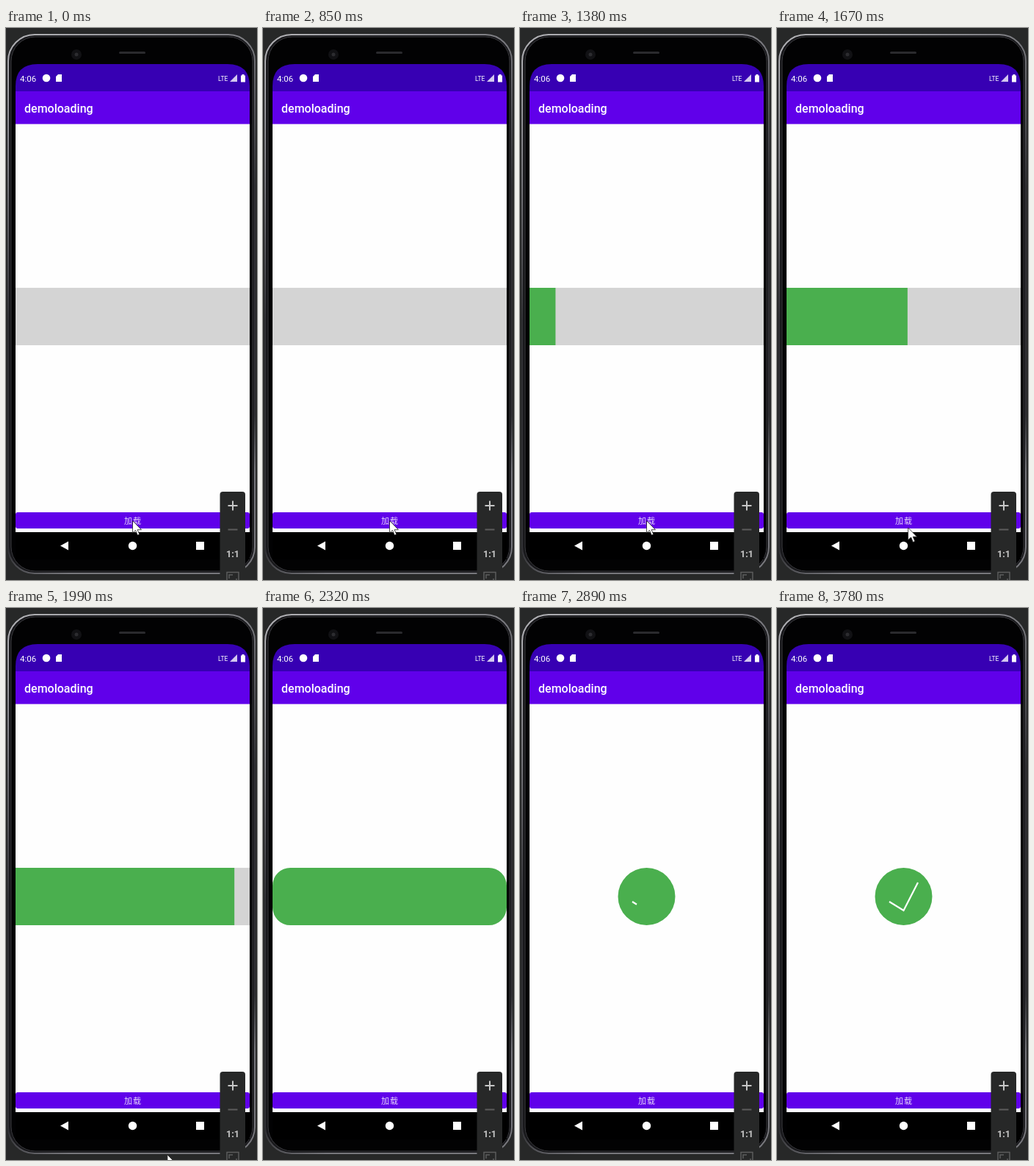
These frames come from a looping animation (342 px wide and 750 px high, 3.82 s). An HTML page:

```html
<!DOCTYPE html>
<html lang="en">
<head>
<meta charset="utf-8">
<title>Loading bar</title>
<style>
  html, body { margin: 0; width: 100%; height: 100%; overflow: hidden; background: #272828; }
  svg { display: block; width: 342px; height: 750px; }
  text { font-family: Roboto, "Noto Sans CJK SC", "Noto Sans CJK", sans-serif; fill: #fff; }
</style>
</head>
<body>
<svg viewBox="0 0 342 750">
  <defs>
    <linearGradient id="edge" x2=".25" y2="1">
      <stop offset="0" stop-color="#b4b4b8"/>
      <stop offset=".25" stop-color="#77777c"/>
      <stop offset=".5" stop-color="#303034"/>
      <stop offset=".9" stop-color="#303034"/>
      <stop offset="1" stop-color="#77777c"/>
    </linearGradient>
  </defs>

  <!-- Phone body -->
  <rect width="342" height="750" fill="#272828"/>
  <rect x="3" y="9" width="336" height="732" rx="36" fill="#18181b" stroke="url(#edge)" stroke-width="2"/>
  <rect x="7" y="12" width="329" height="726" rx="33" fill="#020203" stroke="#38383c"/>
  <circle cx="96" cy="36" r="7" fill="#111114"/>
  <circle cx="96" cy="36" r="2.5" fill="#2c2c30"/>
  <rect x="154" y="32" width="36" height="3" rx="1.5" fill="#2a2a2d"/>

  <!-- Screen -->
  <path d="M13 87V79Q13 49 43 49H302Q332 49 332 79V87Z" fill="#3700b3"/>
  <rect x="13" y="86" width="319" height="45" fill="#6000ea"/>
  <rect x="13" y="130.5" width="319" height="554.5" fill="#fefefe"/>
  <rect x="13" y="685" width="319" height="37" fill="#000"/>

  <!-- Status bar -->
  <text x="19" y="72.5" font-size="11.5">4:06</text>
  <circle cx="55" cy="68" r="5.3" fill="#fff"/>
  <path d="M71 63H76V73H68V66Z" fill="#fff"/>
  <text x="289" y="71.5" font-size="8.5">LTE</text>
  <path d="M305 73L315 63V73Z" fill="#d4c8f0"/>
  <path d="M320 64.5H321.5V63H324.5V64.5H326V73.5H320Z" fill="#fff"/>
  <text x="25" y="115" font-size="16" font-weight="500">demoloading</text>

  <!-- Progress -->
  <rect id="track" x="13" y="353" width="319" height="78" fill="#d4d4d4"/>
  <rect id="bar" y="353" height="78" fill="#4aaf4e"/>
  <path id="tick" d="M153 399L172.5 411L192 373" fill="none" stroke="#fff" stroke-width="2.2"/>

  <!-- Button and navigation -->
  <rect x="13" y="658" width="319" height="22" rx="3" fill="#6000ea"/>
  <text x="161" y="673.5" font-size="11" letter-spacing="1" style="fill:#e4d8fa">加载</text>
  <path d="M74 703.5L85 697.5V709.5ZM259 698H270V709H259Z" fill="#fff"/>
  <circle cx="172.5" cy="703.5" r="5.7" fill="#fff"/>

  <!-- Emulator controls -->
  <rect x="291.5" y="630" width="34.5" height="130" rx="4" fill="#272828"/>
  <path d="M302.5 649H315.5M309 642.5V655.5" stroke="#c6c6c6" stroke-width="2"/>
  <path d="M302.5 681.5H315.5" stroke="#5c5c5c" stroke-width="2"/>
  <text x="309" y="718.5" font-size="12.5" font-weight="700" text-anchor="middle" style="fill:#c6c6c6">1:1</text>
  <path d="M301 756V739.5H317V756M304 748V743H309M309 753H314V748" fill="none" stroke="#5c5c5c" stroke-width="1.5"/>

  <path id="cursor" d="M0 0V16.5L4 13L6.7 19.5L9.3 18.4L6.6 12.2H12Z" fill="#fff" stroke="#222" stroke-width=".8"/>
</svg>
<script>
  const LOOP = 3820;
  const LEFT = 13, WIDTH = 319, HEIGHT = 78;
  const [track, bar, tick, cursor] =
    ["track", "bar", "tick", "cursor"].map(id => document.getElementById(id));
  const tickLength = tick.getTotalLength();

  const phase = (t, start, end) => Math.min(1, Math.max(0, (t - start) / (end - start)));
  const smooth = (t, start, end) => (1 - Math.cos(Math.PI * phase(t, start, end))) / 2;
  const set = (el, attrs) => {
    for (const name in attrs) el.setAttribute(name, attrs[name]);
  };

  function draw(t) {
    const fill = smooth(t, 1168, 2153);
    const corner = smooth(t, 2153, 2443);
    const shrink = smooth(t, 2443, 2794);
    const check = smooth(t, 2794, 3250);
    const inset = shrink * (WIDTH - HEIGHT) / 2;

    set(track, { visibility: fill < 1 ? "visible" : "hidden" });
    set(bar, {
      x: LEFT + inset,
      width: WIDTH * fill - 2 * inset,
      rx: corner * HEIGHT / 2
    });
    set(tick, { "stroke-dasharray": `${check * tickLength} 200` });

    const leave = 1 - (1 - phase(t, 1640, 2160)) ** 2;
    set(cursor, { transform: `translate(${172.5 + 53 * leave} ${669.5 + 82 * leave})` });
  }

  const begin = performance.now();
  function frame() {
    draw((performance.now() - begin) % LOOP);
    requestAnimationFrame(frame);
  }
  frame();
</script>
</body>
</html>
```
